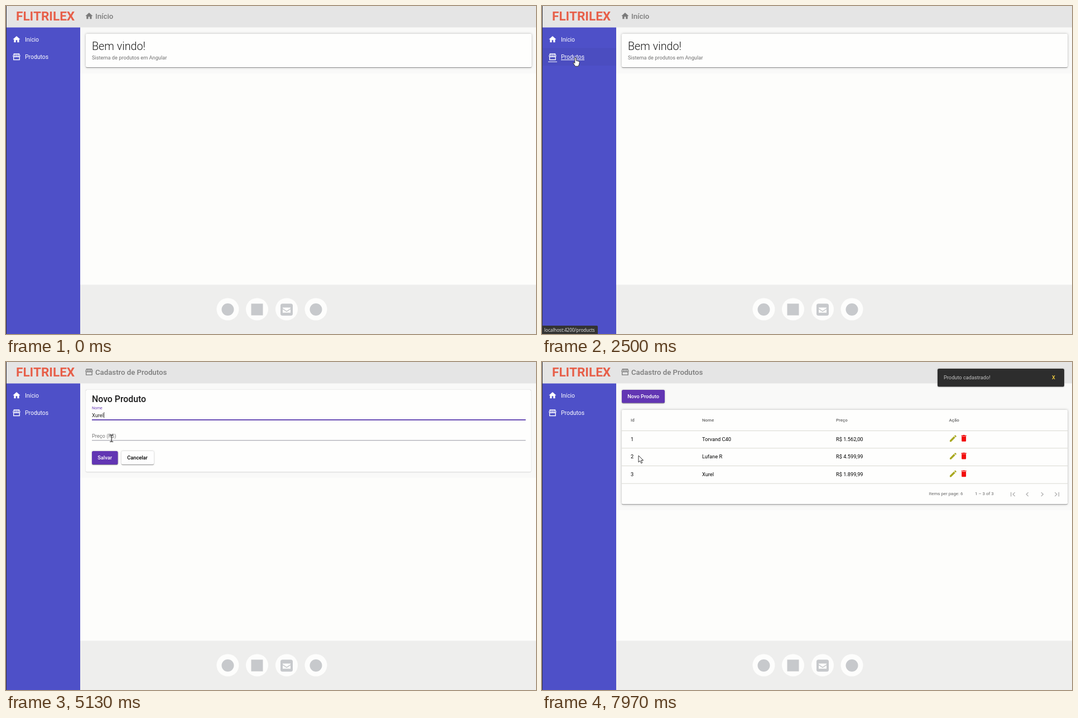
Write an HTML page that moves like this. It is 950 px wide and 589 px high and loops after 8 s.

```html
<!DOCTYPE html>
<html lang="pt-BR">
<head>
<meta charset="utf-8">
<title>Cadastro de Produtos</title>
<style>
  html, body { margin: 0; width: 100%; height: 100%; overflow: hidden; background: #fdfdfb; }
  svg { display: block; width: 100vw; height: 100vh; }
  text { font-family: Roboto, "Open Sans", sans-serif; font-size: 9.24px; white-space: pre; }
  .logo { font-size: 22.6px; font-weight: 700; fill: #e75f49; }
  .heading { font-size: 13.2px; font-weight: 500; fill: #7b7b7b; }
  .menu text { font-size: 10.4px; fill: #fff; }
  .welcome { font-size: 19.8px; font-weight: 300; fill: #1c1c1c; }
  .muted { fill: #6f6f6f; }
  .strong { font-weight: 500; }
  .small { font-size: 7.92px; fill: #666; }
  .title { font-size: 15.84px; font-weight: 500; fill: #1b1b1b; }
  .panel { fill: #f9f9f8; }
  .card { fill: #fefefd; filter: drop-shadow(0 1.3px .7px #0005) drop-shadow(0 .7px 2px #0004); }
  .flat { fill: #fefefd; filter: drop-shadow(0 .8px .5px #0006) drop-shadow(0 .5px 1px #0002); }
  .raised { filter: drop-shadow(0 1px .7px #0005) drop-shadow(0 .7px 1.6px #0004); }
  .line { stroke: #d9d9d2; stroke-width: 1; }
  .status { font-family: "Open Sans", "Noto Sans", sans-serif; font-size: 8.07px; fill: #eee; }
</style>
</head>
<body>
<svg viewBox="0 0 950 589">
  <defs>
    <path id="home" d="M10 20v-6h4v6h5v-8h3L12 3 2 12h3v8z" fill="currentColor"/>
    <path id="store" fill="none" stroke="currentColor" stroke-width="2"
      d="M4 12v8h16v-8M5 4h14l2 6q-.5 2-2.3 2t-2.2-2q0 2-2.2 2t-2.3-2q0 2-2.3 2t-2.2-2q0 2-2.2 2T3 10zM8 4l-.5 6M12 4v6M16 4l.5 6"/>
    <path id="pencil" fill="#a9a820" d="M3 17.25V21h3.75L17.81 9.94l-3.75-3.75zM20.71 7.04a1 1 0 0 0 0-1.41l-2.34-2.34a1 1 0 0 0-1.41 0l-1.83 1.83 3.75 3.75z"/>
    <path id="trash" fill="#f20d0d" d="M6 19c0 1.1.9 2 2 2h8c1.1 0 2-.9 2-2V7H6zM19 4h-3.5l-1-1h-5l-1 1H5v2h14z"/>
    <path id="prev" d="M15.4 7.4 14 6l-6 6 6 6 1.4-1.4L10.8 12z"/>
    <path id="first" d="M18.4 16.6 13.8 12l4.6-4.6L17 6l-6 6 6 6zM6 6h2v12H6z"/>
    <clipPath id="itemClip"><rect id="clipBox" x="1" width="132" height="31.5"/></clipPath>
  </defs>

  <rect width="950" height="589" fill="#fdfdfb"/>
  <rect id="panel" class="panel" x="133" y="39" width="817"/>
  <rect y="500.5" width="950" height="88.5" fill="#eeeeed"/>
  <rect width="950" height="38.5" fill="#e5e5e5"/>
  <rect x="1" y="38.5" width="132" height="550.5" fill="#4e50c8"/>
  <rect width="1" height="589" fill="#33333c"/>
  <text class="logo" x="18" y="26">FLITRILEX</text>

  <g id="headHome" color="#7b7b7b">
    <use href="#home" transform="translate(141 10) scale(.66)"/>
    <text class="heading" x="160" y="22.5">Início</text>
  </g>
  <g id="headProducts" color="#7b7b7b">
    <use href="#store" transform="translate(141 10) scale(.66)"/>
    <text class="heading" x="160" y="22.5">Cadastro de Produtos</text>
  </g>

  <rect id="hoverBg" x="1" width="132" height="31.5" opacity=".04"/>
  <g clip-path="url(#itemClip)"><circle id="ripple" cx="52"/></g>
  <g class="menu" color="#fff">
    <use href="#home" transform="translate(11 52) scale(.66)"/>
    <text id="link0" x="34" y="63.5">Início</text>
    <use href="#store" transform="translate(11 83.3) scale(.66)"/>
    <text id="link1" x="34" y="95.2">Produtos</text>
    <rect id="iconLine" x="11" width="16" height="1" fill="#fff"/>
  </g>

  <g fill="#fdfdfc">
    <circle cx="397.5" cy="544.5" r="20"/><circle cx="450" cy="544.5" r="20"/>
    <circle cx="503" cy="544.5" r="20"/><circle cx="555.5" cy="544.5" r="20"/>
  </g>
  <g fill="#c7c9cc">
    <circle cx="397.5" cy="545" r="11"/>
    <rect x="439.5" y="534.5" width="21" height="21"/>
    <rect x="492" y="534.5" width="22" height="21.5" rx="3.5"/>
    <circle cx="555.5" cy="545" r="11"/>
  </g>
  <path d="M496 541.5h14v1.5l-7 4.5-7-4.5zM496 544.7l7 4.5 7-4.5v6h-14z" fill="#fdfdfc"/>

  <g id="homePage">
    <rect class="card" x="143" y="50" width="799" height="60" rx="2"/>
    <text class="welcome" x="154" y="79">Bem vindo!</text>
    <text class="muted" x="154" y="96">Sistema de produtos em Angular</text>
  </g>

  <g id="listPage">
    <rect class="raised" x="143" y="50" width="77" height="23.5" rx="2.5" fill="#6236b3"/>
    <text class="strong" x="153.3" y="65.2" fill="#fff">Novo Produto</text>
    <rect id="tableCard" class="card" x="143" y="86" width="799" rx="2"/>
    <g class="strong">
      <text class="small" x="159" y="107">Id</text><text class="small" x="287" y="107">Nome</text>
      <text class="small" x="527" y="107">Preço</text><text class="small" x="729.5" y="107">Ação</text>
    </g>
    <path class="line" d="M143 123.5h799"/>
    <g id="rows"></g>
    <g id="pager">
      <text class="small" x="693.5" y="207">Items per page: 6</text>
      <text class="small" id="range" x="776" y="207"></text>
      <g fill="#aeaeae">
        <use href="#first" transform="translate(836 198) scale(.66)"/>
        <use href="#prev" transform="translate(862 198) scale(.66)"/>
        <use href="#prev" transform="translate(904.5 198) scale(-.66 .66)"/>
        <use href="#first" transform="translate(931 198) scale(-.66 .66)"/>
      </g>
    </g>
  </g>

  <g id="formPage">
    <rect class="flat" x="143" y="50" width="798" height="147.5" rx="2"/>
    <text class="title" x="154" y="72">Novo Produto</text>
    <g id="fields"></g>
    <rect class="raised" x="154" y="160" width="46.5" height="24" rx="2.5" fill="#6236b3"/>
    <text class="strong" x="164.3" y="175.4" fill="#fff">Salvar</text>
    <rect class="raised" x="207" y="160" width="58" height="24" rx="2.5" fill="#fefefe"/>
    <text class="strong" x="217.3" y="175.4">Cancelar</text>
  </g>

  <g id="snack">
    <rect class="raised" x="709" y="12" width="227" height="32" rx="2.5" fill="#2d2d2d"/>
    <text x="720" y="31.3" fill="#c4c4c4">Produto cadastrado!</text>
    <text class="strong" x="914" y="31.3" fill="#ffd740">X</text>
  </g>
  <g id="status">
    <path d="M0 574h98q2 0 2 2v13H0z" fill="#333"/>
    <text class="status" x="4" y="585">localhost:4200/products</text>
  </g>

  <g id="cursor" stroke-linejoin="round">
    <path id="arrow" d="M0 0v12l2.8-2.6 2 4.4 2-.9-2-4.3h3.8z" fill="#fff" stroke="#333"/>
    <path id="hand" d="M-1.2 0q1.2-1.4 2.4 0v5l4.6 1.2q1.6.5 1.4 2.3L6.5 12 5 15.2H-.4L-3.8 10q-.8-1.8 1-1.6L-1.2 10z" fill="#fff" stroke="#333"/>
    <path id="beam" d="M-3-6h2q1 0 1 1 0-1 1-1h2M0-5V5M-3 6h2q1 0 1-1 0 1 1 1h2" fill="none" stroke="#333" stroke-width="1.2"/>
  </g>
</svg>
<script>
const LOOP = 8000, ROW = 31.7;
const $ = id => document.getElementById(id);
const set = (el, attrs) => { for (const k in attrs) el.setAttribute(k, attrs[k]); };
const show = (id, on) => { $(id).style.display = on ? '' : 'none'; };
const clamp = v => Math.min(1, Math.max(0, v));
const ease = p => p * p * (3 - 2 * p);
const ramp = (t, start, length) => ease(clamp((t - start) / length));

const products = [
  ['Torvand C40', 'R$ 1.562,00'],
  ['Lufane R', 'R$ 4.599,99'],
  ['Xurel', 'R$ 1.899,99'],
];
$('rows').innerHTML = products.map(([name, price], i) => `
  <g id="row${i}" transform="translate(0 ${i * ROW})">
    <text x="159" y="141.6">${i + 1}</text><text x="287" y="141.6">${name}</text>
    <text x="527" y="141.6">${price}</text>
    <use href="#pencil" transform="translate(729 129.3) scale(.66)"/>
    <use href="#trash" transform="translate(748.2 129) scale(.66)"/>
    <path class="line" d="M143 154.8h799"/>
  </g>`).join('');

const fields = [
  { label: 'Nome', y: 99, focus: 3620, blur: 5180, text: 'Xurel', keys: [4050, 4220, 4400, 4580, 4760] },
  { label: 'Preço (R$)', y: 136, focus: 5180, blur: 7420, text: '1899.99', keys: [5380, 5500, 5600, 5690, 6400, 6530, 6660] },
];
$('fields').innerHTML = fields.map((f, i) => `
  <text id="label${i}" x="154">${f.label}</text>
  <text id="value${i}" x="154" y="${f.y - .4}" fill="#222"></text>
  <rect id="caret${i}" y="${f.y - 9}" width=".8" height="10.5" fill="#222"/>
  <path d="M154 ${f.y + 4.8}h777.5" stroke="#8c8c98" stroke-width=".9"/>
  <rect id="focus${i}" y="${f.y + 4}" height="1.7" fill="#5534ad"/>`).join('');

// Page changes, pointer path [time, x, y] and menu clicks [time, item].
const SAVED = 7550, ENTER = 560;
const pages = [[0, 'home'], [1450, 'list'], [2040, 'home'], [2640, 'list'], [3080, 'form'], [SAVED, 'list']];
const path = [
  [ENTER, 0, 86], [930, 137, 100], [1050, 150, 104], [1280, 62, 94], [1480, 62, 94],
  [1860, 58, 67], [2100, 58, 67], [2480, 60, 93], [2660, 60, 93], [2940, 186, 64],
  [3100, 186, 64], [3370, 204, 67], [3570, 210, 102], [4950, 210, 102], [5160, 188, 139],
  [6850, 188, 139], [7250, 177, 170], [7600, 177, 170], [7900, 173, 168],
];
const clicks = [[1360, 1], [1900, 0], [2550, 1]];

const pageAt = t => pages.filter(p => p[0] <= t).pop()[1];

function pointer(t) {
  const next = path.findIndex(p => p[0] > t);
  if (next < 0) return path[path.length - 1].slice(1);
  if (next === 0) return path[0].slice(1);
  const [a, b] = [path[next - 1], path[next]];
  const p = ramp(t, a[0], b[0] - a[0]);
  return [a[1] + (b[1] - a[1]) * p, a[2] + (b[2] - a[2]) * p];
}

const inside = ([x, y], l, top, r, bottom) => x >= l && x < r && y >= top && y < bottom;
const menuItem = p => inside(p, 1, 44, 133, 75.5) ? 0 : inside(p, 1, 75.5, 133, 107) ? 1 : -1;

function cursorKind(p, page) {
  if (menuItem(p) >= 0) return 'hand';
  if (page === 'list' && inside(p, 143, 50, 220, 74)) return 'hand';
  if (page !== 'form') return 'arrow';
  if (inside(p, 154, 160, 265, 184)) return 'hand';
  return inside(p, 154, 56, 931, 145) ? 'beam' : 'arrow';
}

function drawMenu(t) {
  const item = menuItem(pointer(t - 60)); // hover trails the pointer slightly
  show('hoverBg', item >= 0);
  show('iconLine', item >= 0);
  show('status', item === 1);
  [0, 1].forEach(i => { $('link' + i).style.textDecoration = i === item ? 'underline' : 'none'; });
  if (item >= 0) {
    set($('hoverBg'), { y: 44 + item * 31.5 });
    set($('iconLine'), { y: 68 + item * ROW });
  }
  const click = clicks.find(c => t >= c[0] && t < c[0] + 450);
  show('ripple', click);
  if (click) {
    const age = t - click[0], y = 44 + click[1] * 31.5;
    set($('clipBox'), { y });
    set($('ripple'), { cy: y + 20, r: 90 * clamp(age / 225), opacity: .08 * (1 - clamp((age - 225) / 225)) });
  }
}

function drawField(f, i, t) {
  const focused = t >= f.focus && t < f.blur;
  const float = ramp(t, f.focus, 200);
  const typed = f.keys.filter(k => k <= t).length;
  set($('label' + i), { y: f.y - 14 * float, fill: focused ? '#673ab7' : '#757575' });
  $('label' + i).style.fontSize = 9.24 - 2.31 * float + 'px';
  const value = $('value' + i);
  value.textContent = f.text.slice(0, typed);
  const since = t - (typed ? f.keys[typed - 1] : f.focus);
  show('caret' + i, focused && since % 1000 < 500);
  set($('caret' + i), { x: 154.4 + (typed ? value.getComputedTextLength() : 0) });
  const w = focused ? 777.5 * ramp(t, f.focus, 250) : 0;
  set($('focus' + i), { x: 542.75 - w / 2, width: w });
}

function draw(t) {
  const page = pageAt(t), pos = pointer(t);
  ['home', 'list', 'form'].forEach(p => show(p + 'Page', p === page));
  show('headHome', page === 'home');
  show('headProducts', page !== 'home');
  drawMenu(t);

  const count = t >= SAVED ? 3 : 2, extra = (count - 2) * ROW;
  show('row2', count === 3);
  set($('panel'), { height: { home: 82, list: 195.5 + extra, form: 169 }[page] });
  set($('tableCard'), { height: 137.5 + extra });
  set($('pager'), { transform: `translate(0 ${extra})` });
  $('range').textContent = `1 – ${count} of ${count}`;
  if (page === 'form') fields.forEach((f, i) => drawField(f, i, t));

  const pop = ramp(t, SAVED + 20, 150), size = .8 + .2 * pop;
  show('snack', pop > 0);
  set($('snack'), { opacity: pop, transform: `translate(822.5 28) scale(${size}) translate(-822.5 -28)` });

  show('cursor', t >= ENTER);
  const kind = cursorKind(pos, page);
  ['arrow', 'hand', 'beam'].forEach(k => show(k, k === kind));
  set($('cursor'), { transform: `translate(${pos})` });
}

const start = performance.now();
function tick() {
  draw((performance.now() - start) % LOOP);
  requestAnimationFrame(tick);
}
tick();
</script>
</body>
</html>
```
